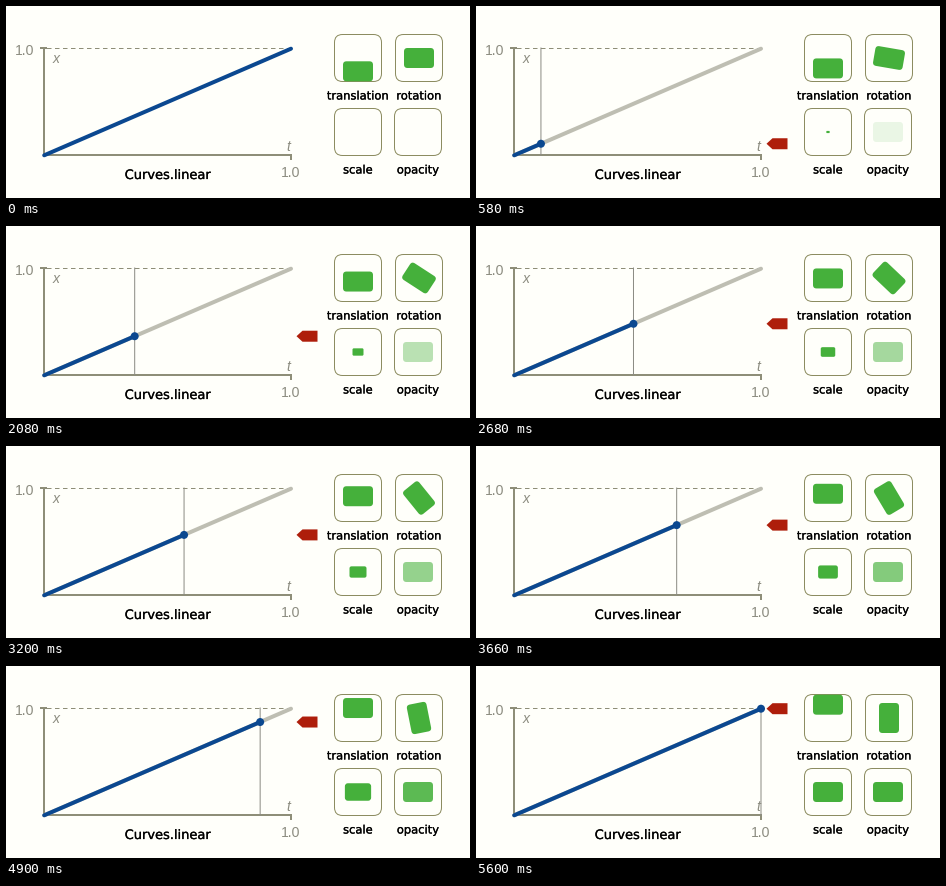
These frames come from a looping animation (464x192 px, 5.62 s). A matplotlib script:

```python
import matplotlib.pyplot as plt
from matplotlib.animation import FuncAnimation
from matplotlib.patches import Circle, FancyBboxPatch, Polygon
from matplotlib.patheffects import withStroke
from matplotlib.transforms import Affine2D

W, H, DPI = 464, 192, 64
PX = 72 / DPI  # points per pixel
TICK_MS, TICKS, STEPS = 20, 281, 120

PAPER, INK = "#fffffa", "#000000"
AXIS, FRAME, LABEL = "#8e8e78", "#8c8c60", "#8c8c80"
BLUE, TRACK, GUIDE = "#0b4890", "#bebeb2", "#8c8c84"
GREEN, RED = "#45b03b", "#ae1e0b"

X0, X1, Y0, Y1 = 38.2, 285, 149.3, 42.7
TILES = {
    "translation": (352, 52),
    "rotation": (413, 52),
    "scale": (352, 126),
    "opacity": (412, 126),
}

fig = plt.figure(figsize=(W / DPI, H / DPI), dpi=DPI, facecolor=PAPER)
ax = fig.add_axes([0, 0, 1, 1])
ax.set(xlim=(0, W), ylim=(H, 0))
ax.axis("off")


def line(xs, ys, color, width, **kw):
    return ax.plot(xs, ys, color=color, lw=width * PX, snap=False, **kw)[0]


def text(x, y, s, size, color, family, **kw):
    return ax.text(x, y, s, size=size * PX, color=color, family=family,
                   ha="center", va="baseline", **kw)


def axis_label(x, y, s, **kw):
    text(x, y, s, 14, LABEL, "Liberation Sans", **kw)


def caption(x, y, s, size):
    stroke = withStroke(linewidth=0.25 * PX, foreground=INK)
    text(x, y, s, size, INK, "DejaVu Sans", path_effects=[stroke])


def rounded(w, h, radius, **kw):
    """Rounded rectangle centred on the origin."""
    box = FancyBboxPatch((-w / 2, -h / 2), w, h,
                         boxstyle=f"round,pad=0,rounding_size={radius}", **kw)
    return ax.add_patch(box)


def place(patch, x, y, scale=1.0, angle=0.0):
    move = Affine2D().scale(scale).rotate_deg(angle).translate(x, y)
    patch.set_transform(move + ax.transData)


def curve(t):
    return t


# Chart
line([41, X1], [42.5, 42.5], AXIS, 1, dashes=(4.5, 3.5), zorder=1)
line([38, 38], [42, 150], AXIS, 2, zorder=2, solid_capstyle="butt")
line([37, 286], [149, 149], AXIS, 2, zorder=2, solid_capstyle="butt")
line([34, 41], [42, 42], AXIS, 2, zorder=2, solid_capstyle="butt")
line([X1, X1], [149, 154], AXIS, 2, zorder=2, solid_capstyle="butt")
axis_label(18.3, 49, "1.0")
axis_label(285, 171, "1.0")
axis_label(50, 57, "x", style="italic")
axis_label(281.8, 145, "t", style="italic")
caption(162, 173, "Curves.linear", 13)

guide = line([], [], GUIDE, 1, zorder=3)
track = line([X0, X1], [Y0, Y1], TRACK, 4, solid_capstyle="round", zorder=4)
trace = line([], [], BLUE, 4, solid_capstyle="round", zorder=5)
dot = ax.add_patch(Circle((X0, Y0), 4, color=BLUE, lw=0, zorder=6))
marker = ax.add_patch(Polygon([(0, 0), (6, -5.5), (21, -5.5), (21, 5.5), (6, 5.5)],
                              color=RED, lw=0, zorder=6))

# Tiles
blocks = {}
for name, (x, y) in TILES.items():
    place(rounded(47, 47, 8, fc="none", ec=FRAME, lw=PX, zorder=2), x, y)
    caption(x, y + 41.5, name, 11.5)
    blocks[name] = rounded(30, 20, 3.5, fc=GREEN, ec="none", zorder=3)
    place(blocks[name], x, y)


def update(tick):
    # Each group of three steps lasts 20, 100 and 20 ms.
    group, rest = divmod(tick, 7)
    step = 3 * group + (rest > 0) + (rest > 5)
    t = step / STEPS
    v = curve(t)
    running = step > 0
    x, y = X0 + (X1 - X0) * t, Y0 + (Y1 - Y0) * v

    for artist in (guide, track, dot, marker, blocks["scale"]):
        artist.set_visible(running)
    trace.set_data([X0, x if running else X1], [Y0, y if running else Y1])
    guide.set_data([x, x], [42, 149])
    dot.center = x, y
    place(marker, 290.5, y)

    cx, cy = TILES["translation"]
    place(blocks["translation"], cx, cy + 13.3 * (1 - 2 * v))
    place(blocks["rotation"], *TILES["rotation"], angle=90 * v)
    place(blocks["scale"], *TILES["scale"], scale=max(v, 1e-3))
    blocks["opacity"].set_alpha(v)
    return [guide, track, trace, dot, marker, *blocks.values()]


anim = FuncAnimation(fig, update, frames=TICKS, interval=TICK_MS,
                     repeat=True, repeat_delay=0, blit=False)
plt.show()
```
